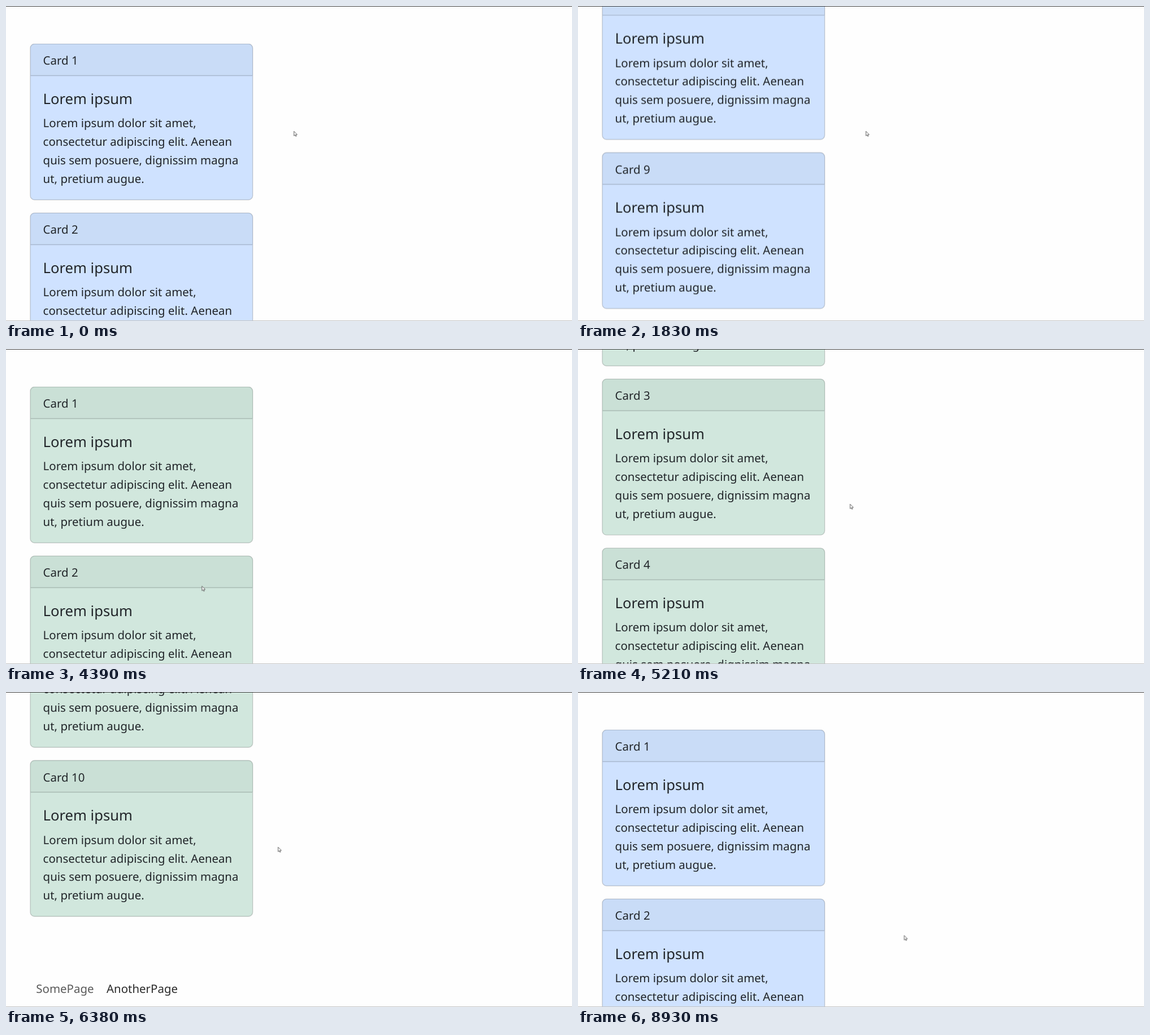
Write an HTML page that moves like this. It is 1002 px wide and 559 px high and loops after 9.87 s.

```html
<!DOCTYPE html>
<html lang="en">
<head>
<meta charset="utf-8">
<title>Card pages</title>
<style>
  html, body { margin: 0; width: 100%; height: 100%; overflow: hidden; background: #fefefe; }
  svg { display: block; width: 100%; height: 100%; }
  svg * { animation: 9.87s step-end infinite; }

  text {
    font-family: "Noto Sans", "Open Sans", sans-serif; font-size: 14.95px;
    fill: #212529; text-rendering: geometricPrecision;
  }
  .title { font-size: 18.7px; }
  .body { fill: var(--body); }
  .head { fill: var(--head); }
  .edge { fill: none; stroke: #000; stroke-opacity: .175; }
  .link { fill: #595959; }
  .status { animation-name: hint; }
  .status rect { fill: #343434; }
  .status text { fill: #f4f4f4; font-size: 8.87px; }
  .early { animation-name: early; }
  .pointer path { fill: #fff; stroke: #3c3c3c; stroke-width: .8; stroke-linejoin: round; }

  .page { animation-name: tint, scroll; }
  .some { animation-name: some; }
  .another { animation-name: another; }
  .pointer { animation-name: move; }
  .pointer .arrow { animation-name: arrow; }
  .pointer .hand { animation-name: hand; }
  .pointer .beam { animation-name: beam; fill: none; }

  /* Motion advances in visible steps, like a slow screen refresh */
  @keyframes scroll {
    0% { transform: translateY(0); }
    2.97% { transform: translateY(0); animation-timing-function: steps(7); }
    11.95% { transform: translateY(-1330px); animation-timing-function: steps(6); }
    20.66% { transform: translateY(-2646px); }
    36.77% { transform: translateY(0); }
    48.62% { transform: translateY(0); animation-timing-function: steps(3); }
    52.78% { transform: translateY(-614px); animation-timing-function: steps(5); }
    59.77% { transform: translateY(-1740px); animation-timing-function: steps(4); }
    64.63% { transform: translateY(-2646px); }
    79.33%, 100% { transform: translateY(0); }
  }
  @keyframes move {
    0% { transform: translate(509.7px, 222px); }
    20.66% { transform: translate(509.7px, 222px); animation-timing-function: steps(3); }
    25.63% { transform: translate(317.5px, 383.5px); animation-timing-function: steps(4); }
    31.1% { transform: translate(257px, 517.5px); }
    40.34% { transform: translate(257px, 517.5px); animation-timing-function: steps(5); }
    47.35% { transform: translate(481.7px, 275px); }
    67.06% { transform: translate(481.7px, 275px); animation-timing-function: steps(6); }
    75.11% { transform: translate(127.5px, 521px); }
    83.38% { transform: translate(127.5px, 521px); animation-timing-function: steps(5); }
    90.47%, 100% { transform: translate(577.5px, 431.7px); }
  }
  @keyframes tint {
    0%, 79.33%, 100% { --body: #cfe2ff; --head: #c9dcf7; }
    36.77% { --body: #d1e7dd; --head: #cae0d6; }
  }
  @keyframes some { 75.11%, 100% { fill: #2b2b2b; } }
  @keyframes another { 31.1%, 100% { fill: #2b2b2b; } }
  @keyframes hint {
    0%, 37.99%, 80.85%, 100% { opacity: 0; }
    33.84%, 76.39% { opacity: .5; }
    35.46%, 77.81% { opacity: 1; }
  }
  @keyframes early { 50%, 100% { visibility: hidden; } }
  @keyframes arrow {
    0%, 41.74%, 84.8%, 100% { opacity: 1; }
    31.1%, 75.11% { opacity: 0; }
  }
  @keyframes hand {
    0%, 37.99%, 80.85%, 100% { opacity: 0; }
    31.1%, 75.11% { opacity: 1; }
  }
  @keyframes beam {
    0%, 41.74%, 84.8%, 100% { opacity: 0; }
    37.99%, 80.85% { opacity: 1; }
  }
</style>
</head>
<body>
<svg viewBox="0 0 1002 559">
  <rect width="1002" height="559" fill="#fefefe"/>
  <g class="page">
    <g transform="translate(42.3 66.6) scale(1.37)">
      <g id="cards"></g>
      <text class="link some" x="8" y="2272.3">SomePage</text>
      <text class="link another" x="99" y="2272.3">AnotherPage</text>
    </g>
  </g>
  <rect width="1002" height="1" fill="#404040"/>
  <rect y="558" width="1002" height="1" fill="#c4c4c4"/>
  <g class="status">
    <rect y="546" width="64.5" height="13"/>
    <rect class="early" y="546" width="122" height="13"/>
    <text x="0.5" y="558">localhost:5174<tspan class="early">/anotherpage</tspan></text>
  </g>
  <g class="pointer">
    <path class="arrow" d="M0 .3V8.4L1.9 6.7 3.1 9.4 4.4 8.8 3.2 6.2H5.7Z"/>
    <path class="hand" d="M-1 1Q0-.6 1 1V5Q2.2 4.2 3 5.4 4.2 4.8 4.8 6 6.2 5.6 6.2 7.2V10.5L5 13V15H-1V13.2L-4 9Q-4.4 7.4-3 7.8L-1 9.4Z"/>
    <path class="beam" d="M-1.5-2H1.5M0-2V8M-1.5 8H1.5"/>
  </g>
</svg>
<script>
const WIDTH = 288.4, HEIGHT = 203, GAP = 16, LINE = 24;
const lines = [
  "Lorem ipsum dolor sit amet,",
  "consectetur adipiscing elit. Aenean",
  "quis sem posuere, dignissim magna",
  "ut, pretium augue."
];

function card(n) {
  const box = `x=".5" y=".5" width="${WIDTH - 1}" height="${HEIGHT - 1}" rx="5.5"`;
  const copy = lines.map((s, i) => `<text x="17" y="${108.6 + LINE * i}">${s}</text>`).join("");
  return `<g transform="translate(0 ${(HEIGHT + GAP) * (n - 1)})">
    <rect class="body" ${box}/>
    <path class="head" d="M.5 41.5V6a5.5 5.5 0 0 1 5.5-5.5H${WIDTH - 6}a5.5 5.5 0 0 1 5.5 5.5V41.5Z"/>
    <path class="edge" d="M1 41.5H${WIDTH - 1}"/>
    <rect class="edge" ${box}/>
    <text x="17" y="27.6">Card ${n}</text>
    <text class="title" x="17" y="78.3">Lorem ipsum</text>${copy}</g>`;
}
document.getElementById("cards").innerHTML =
  Array.from({ length: 10 }, (_, i) => card(i + 1)).join("");
</script>
</body>
</html>
```
